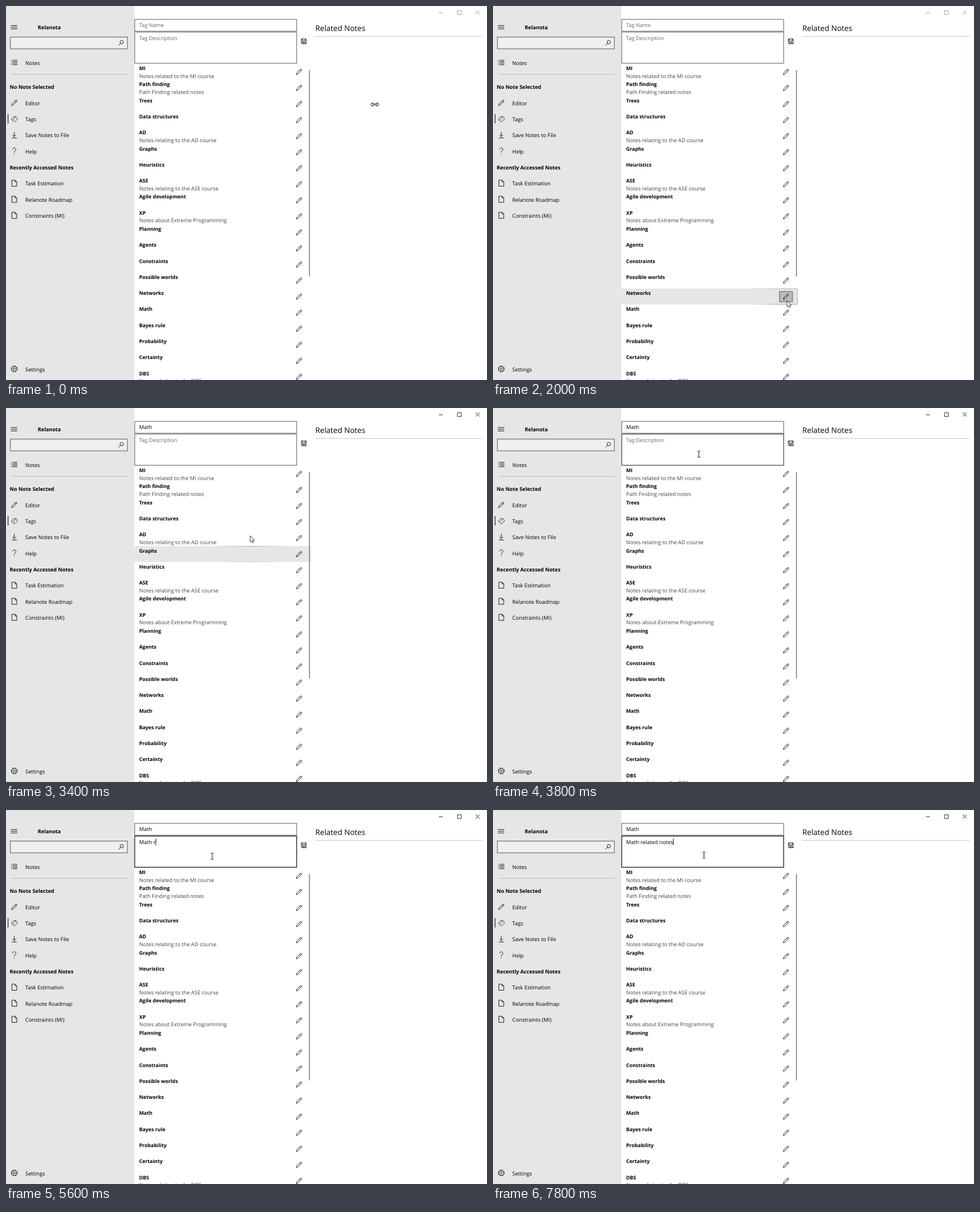
Recreate the animation shown at these times as an HTML page. Size 849 by 659 pixels, loop 8 s.

```html
<!DOCTYPE html>
<html lang="en">
<head>
<meta charset="utf-8">
<title>Tag editor</title>
<style>
html, body { margin: 0; width: 100%; height: 100%; overflow: hidden; background: #fff; }
svg { display: block; width: 100vw; height: 100vh; }
text { font: 9.4px "Open Sans", "Noto Sans", sans-serif; fill: #000; white-space: pre; text-rendering: geometricPrecision; }
.bold { font-weight: 700; font-size: 8.9px; }
.head { font-weight: 700; font-size: 9.15px; }
.sub { fill: #444; }
.hint { fill: #666; }
.icon { fill: none; stroke: #1a1a1a; stroke-width: 1; }
.field { fill: #fff; stroke: #8c8c8c; stroke-width: 1.5; }
.field.hover { stroke: #626262; }
.field.focus { stroke: #333; }
#chrome { fill: none; stroke: #999; stroke-width: .9; }
#chrome.active { stroke: #111; }
#button.hover { fill: #bcbcbc; stroke: #777; stroke-width: 1.4; }
#button.down { fill: #8f8f8f; }
</style>
</head>
<body>
<svg viewBox="0 0 849 659" preserveAspectRatio="none">
  <defs>
    <path id="pencil" d="M-4.8 4.8L-3.9 1.8L2.4-4.3Q3.4-5.2 4.4-4.3Q5.2-3.4 4.3-2.4L-1.9 3.9ZM1.4-3.3L3.3-1.4"/>
    <path id="list" d="M-5.5-3.8h1.4M-5.5-1.2h1.4M-5.5 1.4h1.4M-5.5 4h1.4M-3-3.8h8.5M-3-1.2h8.5M-3 1.4h8.5M-3 4h8.5"/>
    <path id="tag" stroke-width=".85" d="M-5.3.2L-.8-4.2H2.8L5.2-1.8V.6L1 4.8H-.7ZM-3 2.2L2.2-3V-4.2"/>
    <path id="save" d="M0-5.5V2.8M-3.2-.4L0 2.8L3.2-.4M-4.4 5.2H4.4"/>
    <path id="help" d="M-2.9-3.1C-2.8-6.7 3-6.7 3-3.1C3-.7 0-.5 0 2.5M0 4.4v1.3"/>
    <path id="doc" d="M-4.3-5.4H1.4L4.4-2.4V5.4H-4.3ZM1.4-5.4V-2.4H4.4"/>
    <g id="gear">
      <circle r="4.6"/><circle r="5.3" stroke-width="1.1" stroke-dasharray="2.1 2.06"/><circle r="1.9"/>
    </g>
    <path id="disk" d="M-4.3-4.2H4.3V4.3H-3.2L-4.3 3.2ZM-2.6-4.2V-.4H2.6V-4.2M-2.3 4.3V1.6H2.3V4.3M-.6 2.6V4.3"/>
    <radialGradient id="glow" gradientUnits="userSpaceOnUse" r="68">
      <stop offset="0" stop-color="#999"/>
      <stop offset="1" stop-color="#999" stop-opacity="0"/>
    </radialGradient>
    <clipPath id="listClip"><path d="M226 101.8H539V659H226Z"/></clipPath>
  </defs>

  <rect width="849" height="659" fill="#fff"/>
  <g id="side">
    <rect width="226.4" height="659" fill="#e6e6e6"/>
    <path class="icon" d="M8.5 34.4h11.3M8.5 37.4h11.3M8.5 40.4h11.3"/>
    <rect x="7.7" y="54.7" width="206.6" height="20.8" fill="#efefef" stroke="#858585" stroke-width="1.5"/>
    <g class="icon"><circle cx="204.3" cy="63.7" r="3"/><path d="M202.2 65.9L198.6 69.5"/></g>
    <path d="M11 120.5H215" stroke="#bababa"/>
    <path d="M3.6 190.5V207" stroke="#444" stroke-width="1.5"/>
  </g>

  <g clip-path="url(#listClip)">
    <g id="highlight">
      <rect x="226.6" width="311" height="28.2" fill="#e6e6e6"/>
      <rect x="226.6" y=".4" width="310.8" height="27.4" fill="none" stroke="url(#glow)"/>
      <rect id="button" x="505.7" y="5.4" width="22.8" height="18" fill="none"/>
    </g>
    <g id="rows"></g>
    <path d="M535.6 113V476.5" stroke="#747474" stroke-width="1.5"/>
  </g>

  <rect class="field" x="227.3" y="23.6" width="285.7" height="20.9"/>
  <rect class="field" id="area" x="227.3" y="45.9" width="285.7" height="55"/>
  <text id="name" x="235" y="37"></text>
  <text id="desc" x="235" y="59.6"></text>
  <path id="caret" d="M0 50.2V62" stroke="#000" stroke-width=".9"/>
  <use href="#disk" class="icon" x="525.6" y="62.2"/>

  <text x="546" y="44" style="font-size:13.5px">Related Notes</text>
  <path d="M546 53.5H841" stroke="#c6c6c6"/>
  <path id="chrome" d="M764 12h7.2M796.9 8.4h6.8v6.6h-6.8ZM829 8l7 7M836 8l-7 7"/>

  <g stroke-linejoin="round">
    <path id="arrow" fill="#fff" stroke="#111" stroke-width=".8" d="M0 0V11L2.5 8.7L4.2 12.6L6 11.8L4.4 8H7.7Z"/>
    <path id="beam" fill="none" stroke="#111" stroke-width="1" d="M-2.6-5.4H-.8L0-4.8L.8-5.4H2.6M0-4.8V4.8M-2.6 5.4H-.8L0 4.8L.8 5.4H2.6"/>
    <path id="resize" fill="#fff" stroke="#111" stroke-width="1" d="M-7.6 0L-4-3.5V-1.1H4V-3.5L7.6 0L4 3.5V1.1H-4V3.5Z"/>
  </g>
</svg>
<script>
const LOOP = 8000, STEP = 200, PITCH = 28.285, TOP = 101.8;
const $ = id => document.getElementById(id);

const tags = [
  ["MI", "Notes related to the MI course"], ["Path finding", "Path Finding related notes"],
  ["Trees"], ["Data structures"], ["AD", "Notes relating to the AD course"], ["Graphs"],
  ["Heuristics"], ["ASE", "Notes relating to the ASE course"], ["Agile development"],
  ["XP", "Notes about Extreme Programming"], ["Planning"], ["Agents"], ["Constraints"],
  ["Possible worlds"], ["Networks"], ["Math"], ["Bayes rule"], ["Probability"],
  ["Certainty"], ["DBS", "Notes relating to the DBS"]
];
const menu = [
  ["Notes", "list", 99.5], ["Editor", "pencil", 170.6], ["Tags", "tag", 199],
  ["Save Notes to File", "save", 227.4], ["Help", "help", 255.7],
  ["Task Estimation", "doc", 312.2], ["Relanote Roadmap", "doc", 340.5],
  ["Constraints (MI)", "doc", 368.8], ["Settings", "gear", 639.5]
];
const heads = [["Relanota", 56, 41], ["No Note Selected", 6.5, 146.4], ["Recently Accessed Notes", 6.5, 287.8]];

const label = (s, x, y, cls = "") => `<text x="${x}" y="${y}" class="${cls}">${s}</text>`;
const icon = (id, x, y) => `<use href="#${id}" class="icon" x="${x}" y="${y}"/>`;

$("rows").innerHTML = tags.map(([title, note], i) => {
  const y = TOP + i * PITCH;
  return label(title, 235, y + 11.4, "bold") + (note ? label(note, 235, y + 25, "sub") : "") +
    icon("pencil", 517.2, y + 14.2);
}).join("");
$("side").insertAdjacentHTML("beforeend",
  menu.map(([s, id, y]) => label(s, 34, y + 4) + icon(id, 14.6, y)).join("") +
  heads.map(([s, x, y]) => label(s, x, y, "head")).join(""));

// time, pointer, x, y, highlighted row, button state
const moves = [
  [0, "resize", 651, 173.6, -1, ""],
  [600, "arrow", 634, 196, -1, ""],
  [800, "arrow", 590, 262, -1, ""],
  [1000, "arrow", 546, 350, -1, ""],
  [1200, "arrow", 527, 436, 11, "hover"],
  [1400, "arrow", 520, 506, 14, "hover"],
  [1600, "arrow", 519, 533, 15, "hover"],
  [1800, "arrow", 519, 524, 14, "hover"],
  [2000, "arrow", 519, 519, 14, "hover"],
  [2200, "arrow", 522, 538, 15, "hover"],
  [2600, "arrow", 522, 538, 15, "down"],
  [3200, "arrow", 496, 396, 10, ""],
  [3400, "arrow", 431, 225, 5, ""],
  [3600, "arrow", 376, 112, 0, ""],
  [3800, "beam", 363.3, 81.5, -1, ""],
  [4200, "beam", 364, 81.5, -1, ""],
  [7800, "beam", 372.4, 79.5, -1, ""]
];
const phrase = "Math related notes";
// time, characters typed
const typing = [
  [0, 0], [4800, 1], [5000, 2], [5200, 4], [5400, 5], [5600, 6], [5800, 7],
  [6000, 9], [6200, 11], [6400, 13], [6600, 15], [6800, 18]
];
const at = (list, t) => list.findLast(step => step[0] <= t);

function fill(el, value, hint) {
  el.textContent = value || hint;
  el.setAttribute("class", value ? "" : "hint");
}

let last = -1;
function draw() {
  const t = Math.floor(performance.now() % LOOP / STEP) * STEP;
  if (t !== last) {
    last = t;
    const [, kind, x, y, row, state] = at(moves, t);
    for (const id of ["arrow", "beam", "resize"])
      $(id).setAttribute("visibility", id === kind ? "visible" : "hidden");
    $(kind).setAttribute("transform", `translate(${x} ${y})`);

    const top = TOP + row * PITCH;
    $("highlight").setAttribute("display", row < 0 ? "none" : "inline");
    $("highlight").setAttribute("transform", `translate(0 ${top})`);
    $("glow").setAttribute("cx", x);
    $("glow").setAttribute("cy", y - top);
    $("button").setAttribute("class", state);
    $("chrome").setAttribute("class", t >= 2600 ? "active" : "");

    const typed = phrase.slice(0, at(typing, t)[1]);
    fill($("name"), t >= 3200 ? "Math" : "", "Tag Name");
    fill($("desc"), typed, "Tag Description");
    $("area").setAttribute("class", "field " + (t >= 4000 ? "focus" : t >= 3800 ? "hover" : ""));
    $("caret").setAttribute("visibility", t >= 4000 ? "visible" : "hidden");
    const end = typed ? $("desc").getComputedTextLength() : 0;
    $("caret").setAttribute("transform", `translate(${235.5 + end} 0)`);
  }
  requestAnimationFrame(draw);
}
draw();
</script>
</body>
</html>
```
